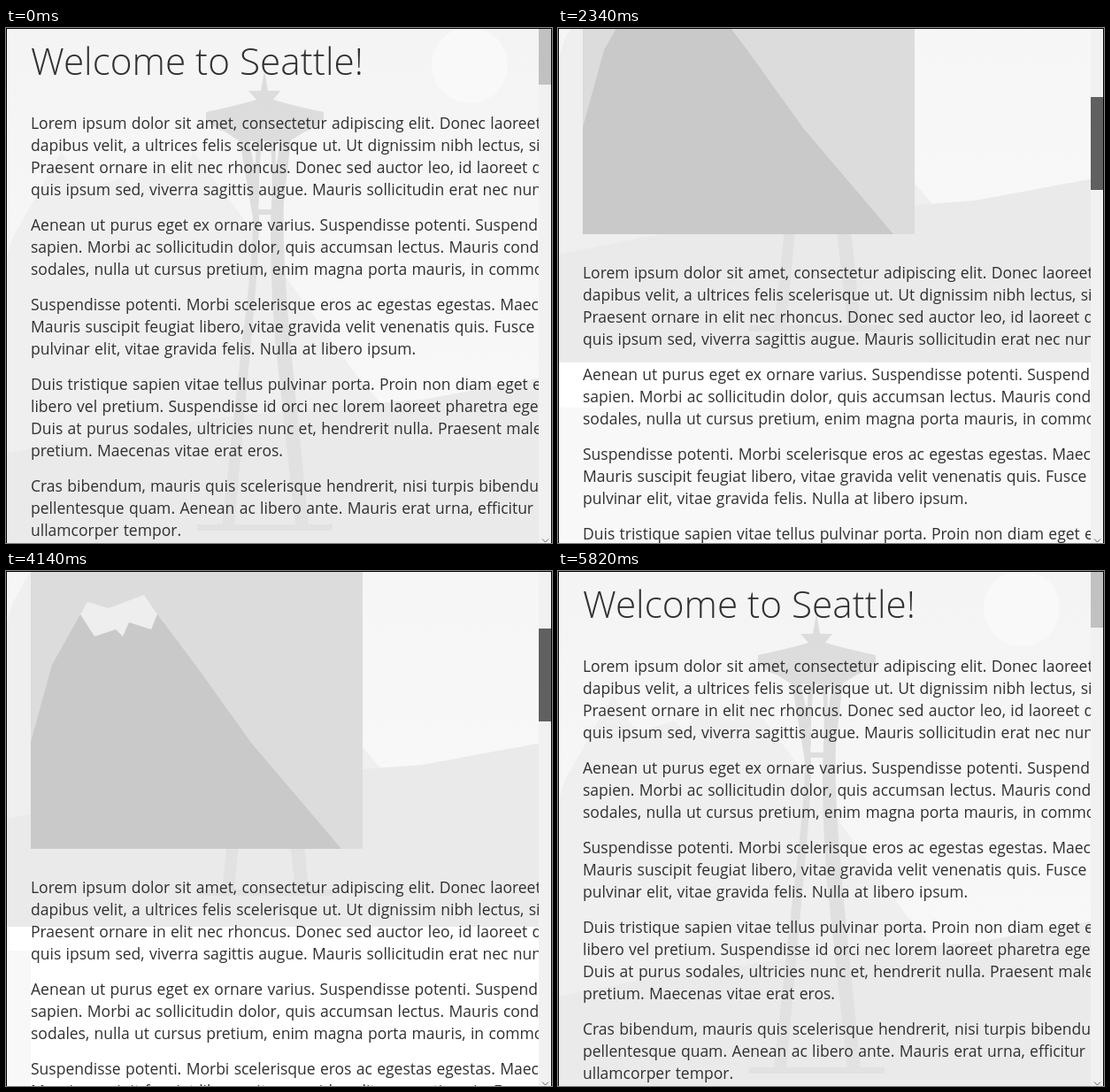
Recreate the animation shown at these times as an HTML page. Size 617 by 582 pixels, loop 6600 ms.

```html
<!DOCTYPE html>
<html lang="en">
<head>
<meta charset="utf-8">
<title>Parallax page</title>
<style>
@property --s { syntax: "<integer>"; inherits: true; initial-value: 0; }

html, body { margin: 0; width: 100%; height: 100%; overflow: hidden; background: #fff; }
.stage {
  position: relative; width: 617px; height: 582px; overflow: hidden; background: #fff;
  animation: scroll 6600ms linear infinite;
}
.stage > * { position: absolute; }

.fill { left: 0; top: 429px; width: 617px; height: 153px; background: #f8f8f8; animation: fill 6600ms step-end infinite; }
.fill.strip { width: 28px; animation: none; }

.back { left: 0; top: calc(var(--s) * -.3px); --rock: #efefef; --snow: #f6f6f6; }
.page {
  left: 28px; top: calc(var(--s) * -1px); width: 574px; height: 1700px; overflow: hidden;
  color: #303030; white-space: nowrap;
  font: 17.5px/25px "Open Sans", "Noto Sans", sans-serif;
}
.page > * { position: absolute; left: 0; margin: 0; }
h1 { top: 7px; font-weight: 300; font-size: 42.3px; line-height: 60px; }
.text { top: 95px; word-spacing: .8px; }
.text.second { top: 1015px; }
p { margin: 0 0 15px; }
.art { top: 609px; --rock: #c9c9c9; --snow: #eee; }
.rock { fill: var(--rock); }
.snow { fill: var(--snow); }

.track { left: 602px; top: 0; width: 14px; height: 582px; background: #f1f1f1; }
.thumb {
  left: 602px; top: calc(var(--s) * .1585px - 41px); width: 14px; height: 105px;
  animation: thumb 6600ms step-end infinite;
}
.arrow { left: 605px; top: 576px; fill: none; stroke: #606060; }
.frame { inset: 0; border: solid #000; border-width: 1px 1px 0; }

/* the page is dragged down, held, then dragged back up in 60 ms steps */
@keyframes scroll {
  0% { --s: 0; }
  12.727% { --s: 0; animation-timing-function: steps(3); }
  15.455% { --s: 68; animation-timing-function: steps(10); }
  24.545% { --s: 366; animation-timing-function: steps(12); }
  35.455% { --s: 751; animation-timing-function: steps(8); }
  42.727% { --s: 1034; animation-timing-function: steps(2); }
  44.545% { --s: 1086; animation-timing-function: steps(2); }
  46.364% { --s: 1107; }
  50.909% { --s: 1107; animation-timing-function: steps(2); }
  52.727% { --s: 1072; animation-timing-function: steps(3); }
  55.455% { --s: 984; animation-timing-function: steps(18); }
  71.818% { --s: 277; animation-timing-function: steps(7); }
  78.182%, 100% { --s: 0; }
}
@keyframes thumb {
  0% { background: #c1c1c1; }
  3.636% { background: #a8a8a8; }
  13.636% { background: #606060; }
  84.545% { background: #a8a8a8; }
  87.273% { background: #b5b5b5; }
  88.182%, 100% { background: #c1c1c1; }
}
@keyframes fill {
  0% { opacity: 1; }
  39.091%, 100% { opacity: 0; }
}
</style>
</head>
<body>
<div class="stage">
  <div class="fill"></div>
  <div class="fill strip"></div>

  <svg class="back" width="617" height="603">
    <defs>
      <linearGradient id="sky" x2="0" y2="1">
        <stop offset="0" stop-color="#f4f4f4"/>
        <stop offset=".7" stop-color="#f8f8f8"/>
      </linearGradient>
      <linearGradient id="steel" gradientUnits="userSpaceOnUse" x1="0" y1="50" x2="0" y2="568">
        <stop offset="0" stop-color="#dcdcdc"/>
        <stop offset="1" stop-color="#e2e2e2"/>
      </linearGradient>
      <g id="peak">
        <path class="rock" d="M0 375V254L24 167 56 110H143L186 167 249 255 351 375Z"/>
        <path class="snow" d="M56 110L64 96 88 103 128 88 143 110 136 127 111 119 104 135 96 127 72 135Z"/>
      </g>
    </defs>
    <rect width="617" height="603" fill="url(#sky)"/>
    <circle cx="524" cy="42" r="43" fill="#f9f9f9"/>
    <use href="#peak" transform="translate(-34.3 -49.2) scale(1.72)"/>
    <path d="M0 481L120 457 270 437 403 425 470 420 617 393V603H0Z" fill="#eaeaea"/>
    <g fill="url(#steel)">
      <path d="M292 48L296 71H310L302 81Q325 88 359 95V103Q350 114 338 117L320 128H264L247 117Q235 114 226 103V95Q260 88 283 81L274 71H288Z"/>
      <path d="M264 126H274Q285 170 286 215Q286 260 277 353L258 562H244L267 353Q279 260 279 215Z"/>
      <path d="M310 126H322L314 195Q312 250 321 353L342 562H327L304 353Q297 260 300 195Z"/>
      <path d="M284 126H290Q285 155 286 200L283 190Q280 155 284 126Z"/>
      <path d="M298 126H304Q306 155 303 190L300 200Q302 155 298 126Z"/>
      <path d="M284 205H302V211H284Z"/>
      <path d="M216 561H369V568H216Z"/>
    </g>
  </svg>

  <main class="page">
    <h1>Welcome to Seattle!</h1>
    <div class="text">
      <p>Lorem ipsum dolor sit amet, consectetur adipiscing elit. Donec laoreet<br>
        dapibus velit, a ultrices felis scelerisque ut. Ut dignissim nibh lectus, sit amet<br>
        Praesent ornare in elit nec rhoncus. Donec sed auctor leo, id laoreet dolor<br>
        quis ipsum sed, viverra sagittis augue. Mauris sollicitudin erat nec nunc</p>
      <p>Aenean ut purus eget ex ornare varius. Suspendisse potenti. Suspendisse<br>
        sapien. Morbi ac sollicitudin dolor, quis accumsan lectus. Mauris condimentum<br>
        sodales, nulla ut cursus pretium, enim magna porta mauris, in commodo</p>
      <p>Suspendisse potenti. Morbi scelerisque eros ac egestas egestas. Maecenas<br>
        Mauris suscipit feugiat libero, vitae gravida velit venenatis quis. Fusce<br>
        pulvinar elit, vitae gravida felis. Nulla at libero ipsum.</p>
      <p>Duis tristique sapien vitae tellus pulvinar porta. Proin non diam eget est<br>
        libero vel pretium. Suspendisse id orci nec lorem laoreet pharetra eget<br>
        Duis at purus sodales, ultricies nunc et, hendrerit nulla. Praesent malesuada<br>
        pretium. Maecenas vitae erat eros.</p>
      <p>Cras bibendum, mauris quis scelerisque hendrerit, nisi turpis bibendum<br>
        pellentesque quam. Aenean ac libero ante. Mauris erat urna, efficitur eget<br>
        ullamcorper tempor.</p>
    </div>
    <svg class="art" width="375" height="375">
      <rect width="375" height="375" fill="#dcdcdc"/>
      <use href="#peak"/>
    </svg>
  </main>

  <div class="track"></div>
  <div class="thumb"></div>
  <svg class="arrow" width="10" height="6"><path d="M1 1.5L4.5 5 8 1.5"/></svg>
  <div class="frame"></div>
</div>
<script>
// the same paragraphs follow the picture
const copy = document.querySelector(".text").cloneNode(true);
copy.classList.add("second");
document.querySelector(".page").append(copy);
</script>
</body>
</html>
```
